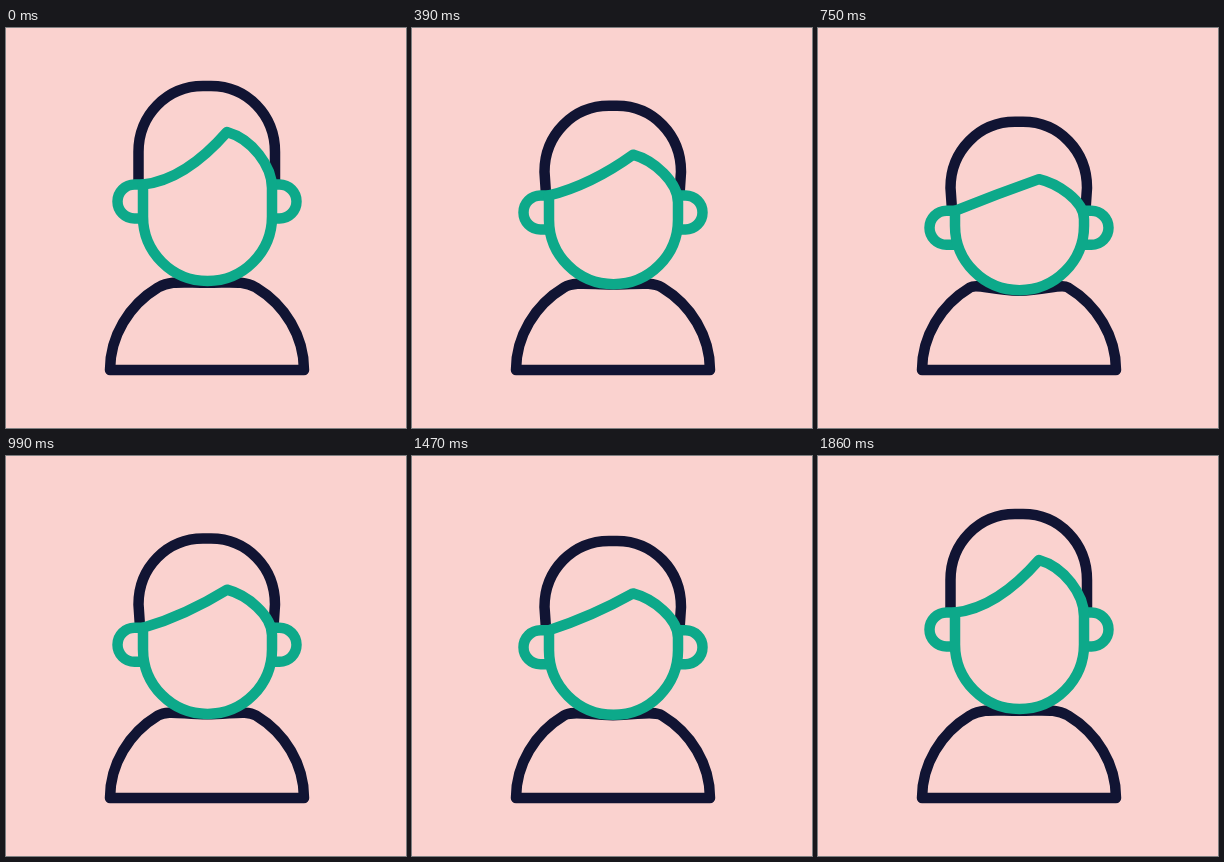
These frames come from a looping animation (400 px wide and 400 px high, 4070 ms). An HTML page:

```html
<!DOCTYPE html>
<html lang="en">
<head>
<meta charset="utf-8">
<title>Nodding figure</title>
<style>
  html, body { margin: 0; width: 100%; height: 100%; overflow: hidden; background: #fad2cf; }
  svg { display: block; width: 100%; height: 100%; }
  path { fill: none; stroke-width: 10.5; stroke-linejoin: round; }
  .navy { stroke: #111433; }
  .green { stroke: #0da98a; }
</style>
</head>
<body>
<svg viewBox="0 0 400 400">
  <path id="body" class="navy"/>
  <path id="hair" class="navy"/>
  <path id="ears" class="green"/>
  <path id="face" class="green"/>
</svg>
<script>
const LOOP = 4070;

// Vertical positions unless the name ends in X; sag bends the fringe.
const rest = {
  crown: 58, hairEndX: 132.5, ear: 173.5, chin: 253, tip: 104, sag: 14.5,
  browX: 246, brow: 111, temple: 138, cheek: 160,
  collarX: 165, collar: 252.5, neckX: 175, neck: 254.7
};
const up = {
  crown: 53.5, hairEndX: 134, ear: 161, chin: 247, tip: 89.5, sag: 17.5,
  browX: 246, brow: 97.5, temple: 126, cheek: 149,
  collarX: 167, collar: 250.5, neckX: 184, neck: 247
};
const down = {
  crown: 101.3, hairEndX: 134, ear: 207, chin: 265, tip: 162.5, sag: -4,
  browX: 238, brow: 166, temple: 181, cheek: 199,
  collarX: 158, collar: 256, neckX: 172, neck: 265.6
};

const mix = (a, b, k) =>
  Object.fromEntries(Object.keys(a).map(key => [key, a[key] + (b[key] - a[key]) * k]));
const tilt = amount => mix(up, down, amount);
const smooth = u => u * u * (3 - 2 * u);

const keys = [
  [0, rest], [200, up], [567, tilt(0.96)], [1070, tilt(0.58)],
  [1338, tilt(1.015)], [1670, up], [1860, rest], [LOOP, rest]
];

function poseAt(time) {
  const next = keys.findIndex(([start]) => start > time);
  const [t0, a] = keys[next - 1], [t1, b] = keys[next];
  return mix(a, b, smooth((time - t0) / (t1 - t0)));
}

const setPath = (id, d) => document.getElementById(id).setAttribute('d', d);
const mirror = x => 402 - x;

function draw(p) {
  const top = p.ear - 17, bottom = p.ear + 17;
  const side = p.chin - 64.5, temples = p.crown + 66;
  const along = k => top + (p.tip - top) * k + p.sag;

  setPath('body', `M104 342 C104 308 123 277 152 259.5
    C${p.collarX} ${p.collar} ${p.neckX} ${p.neck} 201 ${p.neck}
    C${mirror(p.neckX)} ${p.neck} ${mirror(p.collarX)} ${p.collar} 250 259.5
    C279 277 298 308 298 342 Z`);

  setPath('hair', `M${p.hairEndX} ${top - 1} L132.5 ${temples}
    C132.5 ${p.crown + 29} 161 ${p.crown} 197 ${p.crown} h8
    C241 ${p.crown} 269 ${p.crown + 29} 269 ${temples}
    L${401.5 - p.hairEndX} ${top - 1}`);

  setPath('ears', `M137 ${top} H128.5 a17 17 0 0 0 0 34 H139
    M266 ${top} H273.5 a17 17 0 0 1 0 34 H264`);

  setPath('face', `M137 ${top} C165 ${along(1 / 3)} 193 ${along(2 / 3)} 221 ${p.tip}
    C${p.browX} ${p.brow} 266 ${p.temple} 266 ${p.cheek}
    V${side} A64.5 64.5 0 0 1 137 ${side} Z`);
}

function frame() {
  draw(poseAt(performance.now() % LOOP));
  requestAnimationFrame(frame);
}
frame();
</script>
</body>
</html>
```
